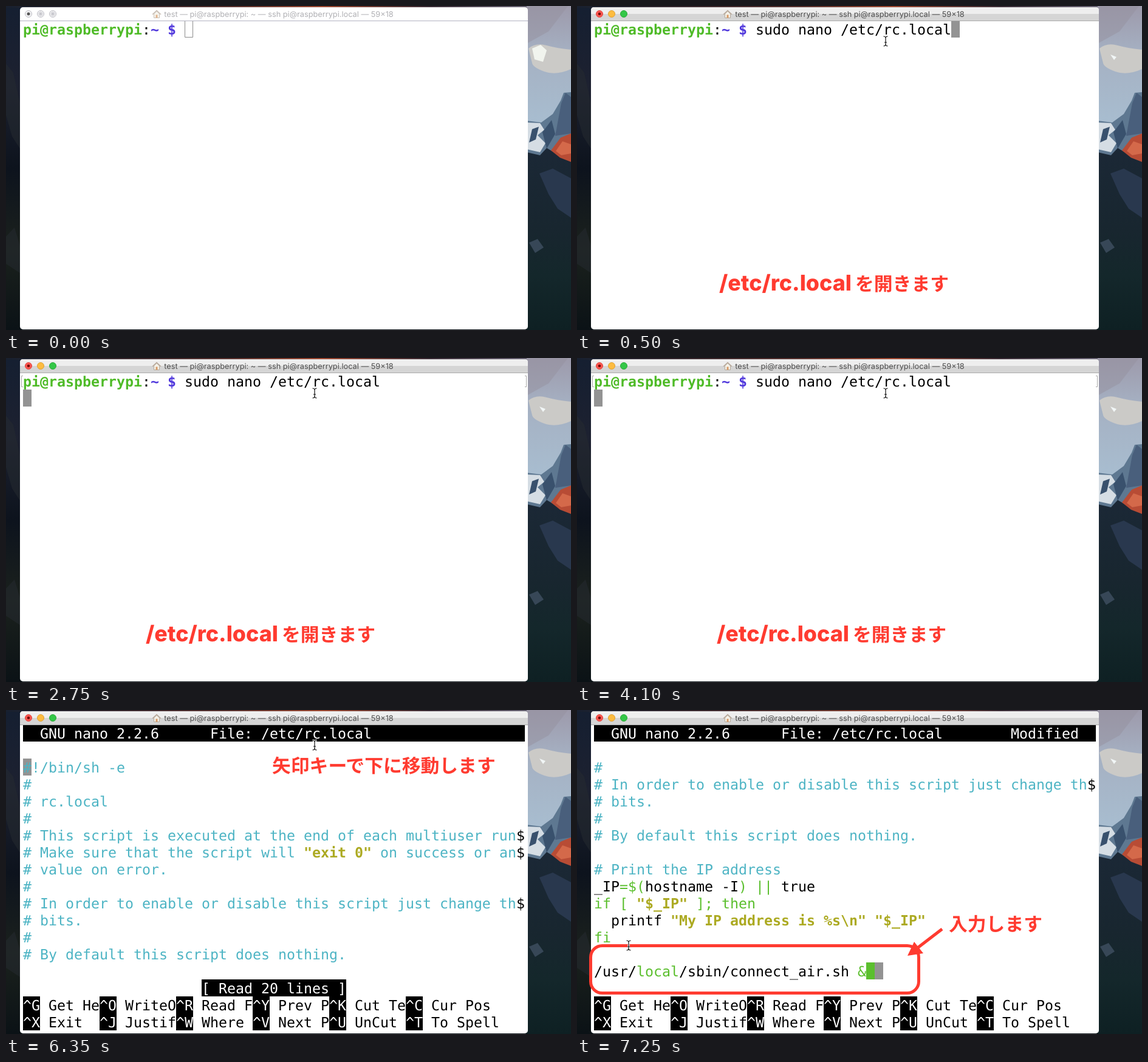
An HTML page for the animation above (8 s loop, 930 by 534 pixels).

```html
<!DOCTYPE html>
<html lang="ja">
<head>
<meta charset="utf-8">
<style>
  html, body { margin: 0; width: 100%; height: 100%; overflow: hidden; }
  svg { display: block; }
  text { white-space: pre; text-rendering: geometricPrecision; }
  .mono { font: 23.25px "DejaVu Sans Mono", monospace; }
  .title { font: 12.75px Inter, sans-serif; text-anchor: middle; }
  .jp { font: 900 30.8px "Noto Sans CJK JP", "Noto Sans CJK", sans-serif; fill: #ff3b30; }
  .latin { font: 800 35.8px Inter, sans-serif; fill: #ff3b30; }
  .prompt { fill: #4fbb28; font-weight: bold; }
  .path { fill: #5038dc; font-weight: bold; }
  .comment { fill: #4db4c4; }
  .key { fill: #5bbf2e; }
  .str { fill: #acaa22; font-weight: bold; }
  .inv { fill: #fff; }
</style>
</head>
<body>
<svg width="930" height="534" viewBox="0 0 930 534">
  <defs>
    <linearGradient id="cliff" x2="0" y2="1">
      <stop offset="0" stop-color="#151f31"/><stop offset=".25" stop-color="#1d2130"/>
      <stop offset=".5" stop-color="#0d131d"/><stop offset=".75" stop-color="#1b211d"/>
      <stop offset="1" stop-color="#0b1216"/>
    </linearGradient>
    <linearGradient id="ridge">
      <stop offset="0" stop-color="#18202f"/><stop offset=".4" stop-color="#5a3330"/>
      <stop offset=".56" stop-color="#a04a32"/><stop offset=".75" stop-color="#3a2c36"/>
      <stop offset=".92" stop-color="#6b6676"/><stop offset="1" stop-color="#9795a6"/>
    </linearGradient>
    <linearGradient id="sky" x2="0" y2="1">
      <stop offset="0" stop-color="#9d9aab"/><stop offset=".3" stop-color="#a5b0c2"/>
      <stop offset="1" stop-color="#a9c3d6"/>
    </linearGradient>
    <linearGradient id="forest" x2="0" y2="1">
      <stop offset="0" stop-color="#1b2836"/><stop offset=".45" stop-color="#18262f"/>
      <stop offset=".7" stop-color="#14272b"/><stop offset="1" stop-color="#0e2023"/>
    </linearGradient>
  </defs>

  <!-- wallpaper -->
  <rect width="930" height="534" fill="url(#cliff)"/>
  <path d="M0 95L12 110 23 160V235L10 215 0 180ZM0 380L14 365 23 395V440L0 425Z" fill="#262a31" opacity=".55"/>
  <rect width="930" height="3" fill="url(#ridge)"/>
  <rect x="857" width="73" height="250" fill="url(#sky)"/>
  <path d="M857 0H925L893 42 857 62Z" fill="#96929f" opacity=".5"/>
  <path d="M860 70Q872 60 890 65T930 72V104Q905 115 886 108T866 94Z" fill="#cbcac7"/>
  <path d="M857 189L881 192 900 178 913 156 918 143 930 142V250H857Z" fill="#5e7891"/>
  <path d="M914 160L921 143 930 150V210L904 214Z" fill="#495f7c"/>
  <path d="M857 192L879 193 886 204 875 213 888 226 879 241 857 236Z" fill="#d5dde4"/>
  <path d="M866 203L877 199 872 220 861 225ZM883 208L898 188 904 211 890 235Z" fill="#39516d"/>
  <path d="M857 241L879 246 890 234 905 243 930 254V534H857Z" fill="url(#forest)"/>
  <path d="M897 238L913 217 930 210V257L912 250Z" fill="#b84c35"/>
  <path d="M905 239L916 223 930 228V243L914 246Z" fill="#d4694a"/>
  <path d="M878 276L900 268 930 284V349L908 334 893 310Z" fill="#2e3c55" opacity=".8"/>
  <path d="M861 390L875 384 885 398 871 407Z" fill="#46566a" opacity=".7"/>
  <path data-on="0" d="M866 70L880 64 890 73 884 92 870 88Z" fill="#f1f4ee"/>
  <path data-on="1234" d="M878 80L888 84 884 89Z" fill="#f1f6f6"/>

  <!-- window -->
  <rect x="23" y="2" width="836" height="531" rx="5" fill="#fff"/>
  <g data-on="0">
    <path d="M23 24.5H859" stroke="#b2b2c2"/>
    <g fill="#f2f2f4" stroke="#bdbdc4">
      <circle cx="37" cy="13" r="5.5"/><circle cx="57" cy="13" r="5.5"/><circle cx="77" cy="13" r="5.5"/>
      <path d="M53 13H61M57 9V17M73 13H81M77 9V17M54 10L60 16M60 10L54 16M74 10L80 16M80 10L74 16"/>
    </g>
    <circle cx="37" cy="13" r="2.5" fill="#555"/>
  </g>
  <g data-on="1234">
    <path d="M23 13V7Q23 2 28 2H854Q859 2 859 7V13Z" fill="#eee"/>
    <path d="M23 13H859V24H23Z" fill="#d5d5d5"/>
    <path d="M23 24.5H859" stroke="#aaa"/>
    <circle cx="37" cy="13" r="5.5" fill="#fc5650" stroke="#df4640"/>
    <circle cx="57" cy="13" r="5.5" fill="#fdbc40" stroke="#dfa034"/>
    <circle cx="77" cy="13" r="5.5" fill="#34c748" stroke="#2aa838"/>
    <circle cx="37" cy="13" r="2.3" fill="#730a08"/>
  </g>
  <g id="house">
    <path d="M243.500 13V19.500H252.500V13L248 8.500Z" fill="#f5f2e9" stroke="#b5aa9c"/>
    <path d="M241 14L248 7.500 255 14" fill="none" stroke="#b5a698" stroke-width="1.500"/>
    <path d="M246.500 14.500H249.500V19.500H246.500Z" fill="#d79a67"/>
  </g>
</svg>
<script>
const svg = document.querySelector('svg');
const CUTS = [500, 2750, 5000, 7250], LOOP = 8000;
const CELL = 14, ROW = 28, LEFT = 28, TOP = 24;
let layer;

function add(tag, attrs, content = '') {
  const el = document.createElementNS('http://www.w3.org/2000/svg', tag);
  for (const name in attrs) el.setAttribute(name, attrs[name]);
  el.textContent = content;
  layer.append(el);
  return el;
}

// Starts a layer that is visible in the listed scenes.
function on(scenes) {
  layer = svg;
  layer = add('g', { 'data-on': scenes });
}

function block(row, col, width, fill) {
  const y = Math.max(25, TOP + row * ROW);
  add('rect', { x: LEFT + col * CELL, y, width: width * CELL, height: TOP + (row + 1) * ROW - y, fill });
}

// Writes a terminal row; {style:text} sets the style of a run.
function line(row, markup, col = 0) {
  for (const [, style, styled, plain] of markup.matchAll(/\{(\w+):([^}]*)\}|([^{]+)/g)) {
    const run = styled ?? plain;
    if (style === 'inv') block(row, col, run.length, '#000');
    add('text', { class: `mono ${style || ''}`, x: LEFT + col * CELL, y: 47 + row * ROW }, run);
    col += run.length;
  }
}

const lines = (row, list) => list.forEach((markup, i) => markup && line(row + i, markup));
const label = (x, y, str, cls = 'jp') => add('text', { x, y, class: cls }, str);
const stroke = (d, color, width) => add('path', { d, fill: 'none', stroke: color, 'stroke-width': width });

function openCaption(x, y) {
  label(x, y, '/etc/rc.local', 'latin');
  label(x + 224, y, 'を開きます');
}

function pointer(x, y) {
  const d = `M${x - 3.5} ${y - 8}Q${x} ${y - 8} ${x} ${y - 5}Q${x} ${y - 8} ${x + 3.5} ${y - 8}` +
    `M${x} ${y - 6}V${y + 6}M${x - 2} ${y + 2}H${x + 2}` +
    `M${x - 3.5} ${y + 8}Q${x} ${y + 8} ${x} ${y + 5}Q${x} ${y + 8} ${x + 3.5} ${y + 8}`;
  stroke(d, '#fff', 3);
  stroke(d, '#111', 1.2);
}

const title = 'test — pi@raspberrypi: ~ — ssh pi@raspberrypi.local — 59×18';
for (const [scenes, fill] of [['0', '#b0b0b4'], ['1234', '#4c4c4c']]) {
  on(scenes);
  add('text', { x: 449, y: 18, class: 'title', fill }, title);
}

// Shell
on('012');
line(0, '{prompt:pi@raspberrypi}:{path:~ $}');
on('0');
stroke('M294.500 25V51.500H307.500V25', '#8c8c8c', 1);
on('12');
line(0, 'sudo nano /etc/rc.local', 19);
on('1');
block(0, 42, 1, '#939393');
openCaption(234, 469);
on('2');
block(1, 0, 1, '#939393');
stroke('M28 29.500H25.500V47.500H28M854 29.500H856.500V47.500H854', '#aaa', 1);
openCaption(230, 467);

// Editor
on('34');
line(0, `{inv:${'  GNU nano 2.2.6      File: /etc/rc.local'.padEnd(59)}}`);
const help = [
  ['^G Get He', '^O WriteO', '^R Read F', '^Y Prev P', '^K Cut Te', '^C Cur Pos'],
  ['^X Exit', '^J Justif', '^W Where', '^V Next P', '^U UnCut', '^T To Spell'],
];
help.forEach((keys, r) => keys.forEach((key, i) =>
  line(16 + r, `{inv:${key.slice(0, 2)}}${key.slice(2)}`, i * 9)));

on('3');
block(2, 0, 1, '#939393');
lines(2, [
  '{comment:#!/bin/sh -e}',
  '{comment:#}',
  '{comment:# rc.local}',
  '{comment:#}',
  '{comment:# This script is executed at the end of each multiuser run}$',
  '{comment:# Make sure that the script will }{str:"exit 0"}{comment: on success or an}$',
  '{comment:# value on error.}',
  '{comment:#}',
  '{comment:# In order to enable or disable this script just change th}$',
  '{comment:# bits.}',
  '{comment:#}',
  '{comment:# By default this script does nothing.}',
]);
line(15, '{inv:[ Read 20 lines ]}', 21);
label(438, 103, '矢印キーで下に移動します');

on('4');
line(0, '{inv:Modified}', 49);
lines(2, [
  '{comment:#}',
  '{comment:# In order to enable or disable this script just change th}$',
  '{comment:# bits.}',
  '{comment:#}',
  '{comment:# By default this script does nothing.}',
  '',
  '{comment:# Print the IP address}',
  '_IP{key:=$(}hostname -I{key:)} {key:||} true',
  '{key:if [ }{str:"$_IP"}{key: ]; then}',
  '  printf {str:"My IP address is %s\\n"} {str:"$_IP"}',
  '{key:fi}',
  '',
  '/usr/{key:local}/sbin/connect_air.sh {key:&}',
]);
block(14, 32, 1, '#5bbf2e');
block(14, 33, 1, '#939393');
add('rect', { x: 22.5, y: 388.5, width: 540, height: 78, rx: 19, fill: 'none', stroke: '#ff3b30', 'stroke-width': 5 });
stroke('M601 361L558 394', '#ff3b30', 5);
add('path', { d: 'M544 405L555 382 570 401Z', fill: '#ff3b30' });
label(612, 364, '入力します');
pointer(85, 388);

on('123');
pointer(508, 58);

const parts = [...document.querySelectorAll('[data-on]')];
const house = document.getElementById('house');

function draw() {
  const t = performance.now() % LOOP;
  const scene = CUTS.filter(cut => t >= cut).length;
  for (const part of parts) part.style.display = part.dataset.on.includes(scene) ? '' : 'none';
  house.style.opacity = scene ? 1 : 0.75;
  requestAnimationFrame(draw);
}
draw();
</script>
</body>
</html>
```
